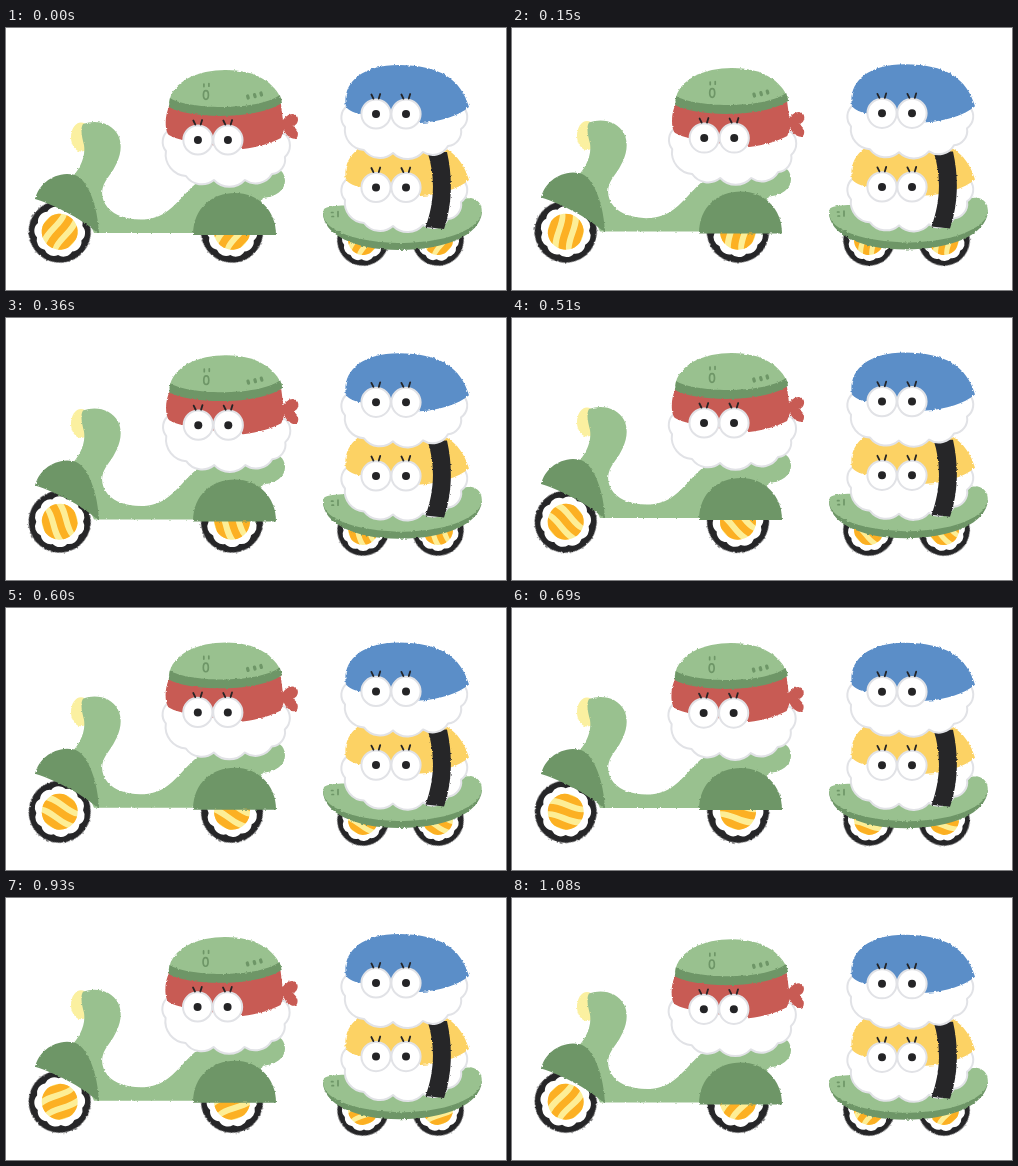
Recreate the animation shown at these times as an HTML page. Size 500x262 px, loop 1110 ms.

```html
<!DOCTYPE html>
<html lang="en">
<head>
<meta charset="utf-8">
<title>Sushi scooter</title>
<style>
html, body { margin: 0; width: 100%; height: 100%; overflow: hidden; background: #fff; }
svg { display: block; width: 100vw; height: 100vh; }
.light { fill: #99c18f; }
.dark { fill: #6e9667; }
.mark { fill: none; stroke: #6e9667; stroke-width: 1.7; stroke-linecap: round; }
.rice { fill: #fff; stroke: #e1e2e6; stroke-width: 2; stroke-linejoin: round; }
.lash { fill: none; stroke: #242426; stroke-width: 1.8; stroke-linecap: round; }
.ink { fill: #262628; }
.fuzzy { filter: url(#fuzz); }
</style>
</head>
<body>
<svg viewBox="0 0 500 262">
  <defs>
    <filter id="fuzz" filterUnits="userSpaceOnUse" x="-60" y="-60" width="620" height="380" color-interpolation-filters="sRGB">
      <feTurbulence type="fractalNoise" baseFrequency=".4" numOctaves="1" seed="4"/>
      <feDisplacementMap in="SourceGraphic" scale="2.8" xChannelSelector="R" yChannelSelector="G"/>
      <feGaussianBlur stdDeviation=".4"/>
    </filter>
    <clipPath id="yolk"><circle r="18"/></clipPath>
    <g id="wheel">
      <circle class="ink fuzzy" r="31"/>
      <path id="ring" fill="#fff"/>
      <g clip-path="url(#yolk)">
        <rect x="-18" y="-18" width="36" height="36" fill="#fdee96"/>
        <path d="M-19 -12C-8 -17 6 -10 19 -15M-19 2C-7 -4 7 4 19 -2M-19 15C-6 10 8 17 19 12" fill="none" stroke="#fcb023" stroke-width="7.4"/>
      </g>
    </g>
    <g id="eye">
      <circle class="rice" r="14.6"/>
      <circle r="4" fill="#242426"/>
      <path class="lash" d="M-4.6 -19.5L-2.6 -15.4M4.2 -20L2.8 -15.4"/>
    </g>
    <g id="eyes"><use href="#eye"/><use href="#eye" x="30"/></g>
    <path id="pile" class="rice"/>
    <path id="slice" d="M340 79C336 58 352 37 393 37C433 37 455 51 463 79C452 88 434 94 414 95C400 95 392 92 384 89C370 85 350 90 340 79Z"/>
  </defs>

  <g class="wheel" data-at="53.7 203.7 1"></g>
  <g class="wheel" data-at="226 203.7 1"></g>
  <g class="wheel" data-at="357 212 .83"></g>
  <g class="wheel" data-at="432 212 .83"></g>

  <g class="bob" data-rise="5.4">
    <g class="fuzzy">
      <ellipse cx="75" cy="109" rx="10" ry="14.5" fill="#fbf0a0"/>
      <path class="light" d="M77 96C90 91 106 95 112 107C119 121 111 137 103 148C95 158 93 169 102 180C111 190 131 194 147 190C163 186 171 174 183 162C190 155 200 146 215 141L266 140C275 139 279 146 279 153C279 162 270 169 257 170L240 205L88 205L64 152C73 142 80 130 78 117C76 109 74 101 77 96Z"/>
      <path class="dark" d="M29 171C33 157 44 147 61 146C70 146 75 149 80 157C88 170 92 187 93 206C79 194 55 179 29 171Z"/>
      <path class="dark" d="M187 207C187 180 206 165 229 165C252 165 270 182 270 207Z"/>
    </g>
  </g>

  <g class="bob" data-rise="7.6" data-sway=".4">
    <path id="rider" class="rice"/>
    <g class="fuzzy">
      <path fill="#c85b54" d="M164 77C158 88 159 103 163 107C172 113 204 117 237 121C252 119 266 115 275 110L278 102C281 110 292 115 292 106C292 102 289 99 286 98C292 98 294 90 290 87C285 84 280 88 277 92L275 76Z"/>
      <path class="light" d="M163 75C166 53 192 42 220 42C249 42 269 54 276 73C262 83 184 88 163 75Z"/>
      <path class="dark" d="M164 70C180 81 250 84 274 67L276 75C251 92 183 91 163 79Z"/>
    </g>
    <g class="mark">
      <ellipse cx="200" cy="67" rx="2.5" ry="4.3"/>
      <path d="M198 56v2.6M203 55.6v2.6"/>
      <path d="M241.7 68l.6 2M248.6 66.6l.6 2M255 65l.6 2" stroke-width="3.2"/>
    </g>
    <use href="#eyes" x="192" y="112"/>
  </g>

  <g class="bob" data-rise="2">
    <g class="fuzzy">
      <path class="dark" d="M317 185C317 206 348 222 393 222C440 222 474 207 476 184Z"/>
      <path class="light" d="M318 181C328 174 360 180 400 178C440 176 453 171 465 170C477 172 479 186 471 194C456 209 425 215 392 215C354 214 311 203 318 181Z"/>
    </g>
    <path class="mark" d="M325.5 184.5h1.5M326 188.5h1.5M332 183.5v5"/>
  </g>

  <g class="bob" data-rise="2.4">
    <g transform="translate(0 73)">
      <use href="#pile"/>
      <use href="#slice" class="fuzzy" fill="#fcd264"/>
    </g>
    <path class="ink fuzzy" d="M421.5 124L441 124C447 150 446 178 438 201L419.5 199C428 176 430 150 421.5 124Z"/>
    <use href="#eyes" x="370" y="159.5"/>
  </g>
  <g class="bob" data-rise="2.6">
    <use href="#pile"/>
    <use href="#slice" class="fuzzy" fill="#5b8ec8"/>
    <use href="#eyes" x="370" y="86"/>
  </g>
</svg>
<script>
const LOOP = 1110, STEP = 30;
// time in ms, share of the full rise
const LIFT = [[0, 0], [150, .26], [360, .64], [510, .92], [590, 1], [690, .91], [810, .65], [1080, .09], [1110, 0]];
const $ = id => document.getElementById(id);

// Scalloped outline through the given notches
const scallop = (pts, bulge = .68) => pts.map(([x, y], i) => {
  if (!i) return `M${x} ${y}`;
  const [px, py] = pts[i - 1], r = Math.hypot(x - px, y - py) * bulge;
  return `A${r} ${r} 0 0 0 ${x} ${y}`;
}).join("") + "Z";

$("rider").setAttribute("d", scallop([[163, 102], [160, 123], [180, 148], [208, 152], [239, 152], [266, 146], [279, 129], [279, 106]]));
$("pile").setAttribute("d", scallop([[341, 78], [339, 99], [358, 122], [387, 125], [417, 124], [442, 118], [455, 101], [458, 80]]));
$("ring").setAttribute("d", scallop(Array.from({ length: 11 }, (_, i) => {
  const a = -i * Math.PI / 5;
  return [23.4 * Math.cos(a), 23.4 * Math.sin(a)];
})));

const wheels = [...document.querySelectorAll(".wheel")].map(el => {
  el.innerHTML = '<use href="#wheel"/>';
  const [x, y, size] = el.dataset.at.split(" ");
  return { el, place: `translate(${x} ${y}) scale(${size})` };
});
const bobs = [...document.querySelectorAll(".bob")];

function lift(t) {
  const i = LIFT.findIndex(([end]) => end > t);
  const [t0, a] = LIFT[i - 1], [t1, b] = LIFT[i];
  return a + (b - a) * (t - t0) / (t1 - t0);
}

function draw(t) {
  const up = lift(t), p = t / LOOP, side = Math.sin(2 * Math.PI * p) - .2;
  for (const el of bobs) {
    const { rise, sway = 0 } = el.dataset;
    el.setAttribute("transform", `translate(${sway * side} ${-rise * up})`);
  }
  for (const { el, place } of wheels)
    el.setAttribute("transform", `${place} rotate(${-50 - 180 * p})`);
}

const start = performance.now();
function tick() {
  const t = (performance.now() - start) % LOOP;
  draw(Math.floor(t / STEP) * STEP);
  requestAnimationFrame(tick);
}
tick();
</script>
</body>
</html>
```
